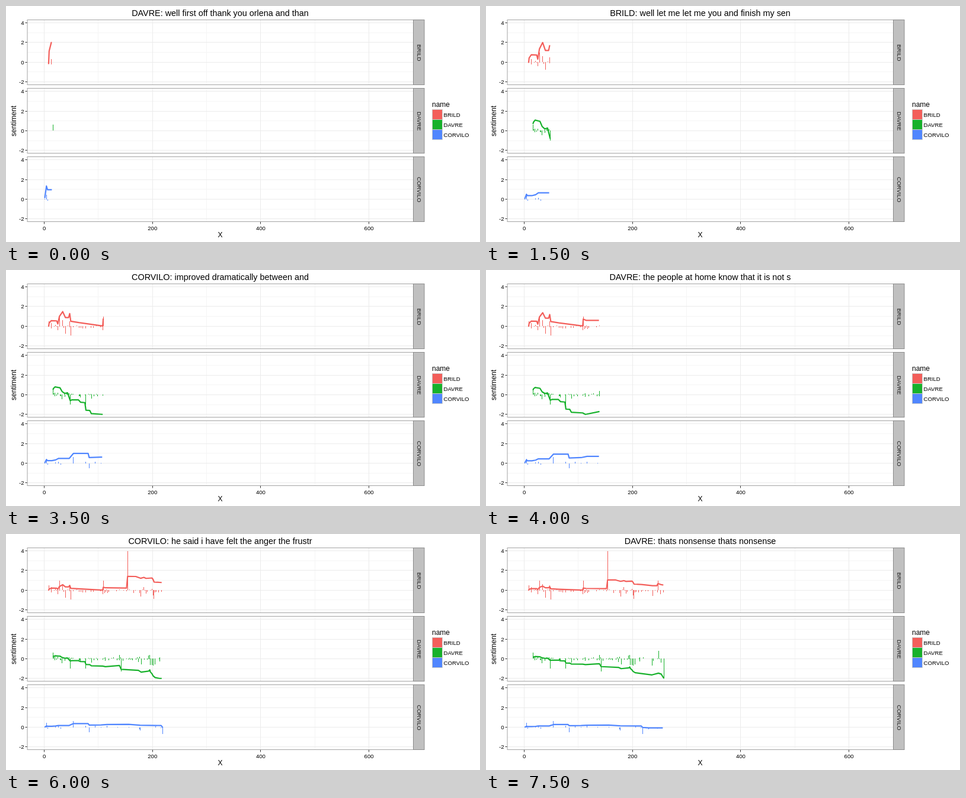
Animation of 800 by 400 pixels, one loop 8000 ms. Source, as an HTML page:

```html
<!DOCTYPE html>
<html lang="en">
<head>
<meta charset="utf-8">
<title>Sentiment by speaker</title>
<style>
  html, body { margin: 0; width: 100%; height: 100%; overflow: hidden; background: #fff; }
  svg { display: block; width: 800px; height: 400px; font-family: "Liberation Sans", Arial, sans-serif; }
</style>
</head>
<body>
<svg id="stage" viewBox="0 0 800 400"></svg>
<script>
const LOOP = 8000, STEP = 500, END = 260;
const LEFT = 36, RIGHT = 687.5, TOP = 23.5, PITCH = 116.2, PANEL_H = 110, UNIT = 16.67;

// turns: key points [x, running sum]; each one's rise or fall is drawn as a bar.
// gap, bias: mean spacing and sign balance of the small bars in between.
const speakers = [
  { name: "BRILD", color: "#f35e5a", gap: 5, bias: .7, turns: [
    [8, -.07], [9, .4], [13, .7], [23, .67], [25, .28], [28, 1.25], [34, 1.85], [39, 1.1],
    [45, 1.1], [47, 1.6], [49, .63], [64, .45], [108, .02], [109, .97], [114, .8], [152, .7],
    [154, 4.7], [169, 4.65], [178, 4.03], [184, 4.35], [188, 4], [199, 4.15], [201, 3.65],
    [203, 2.75], [217, 2.6], [237, 2.02], [245, 2.02], [247, 3.02], [252, 2.6], [257, 2.35]] },
  { name: "DAVRE", color: "#17b12b", gap: 4, bias: .5, turns: [
    [16, .63], [17, .8], [20, 1], [29, .88], [33, .4], [38, .17], [43, .25], [48, -.75],
    [51, -.65], [63, -.65], [67, -.95], [75, -1], [77, -1.97], [84, -2], [87, -2.4], [108, -2.5],
    [113, -2.7], [139, -2.3], [142, -3.6], [174, -3.95], [179, -4.55], [193, -4.2], [195, -3.8],
    [196, -4.45], [199, -5.1], [201, -5.8], [205, -6.4], [213, -6.68], [236, -7.4], [248, -6.6],
    [253, -7], [258, -9]] },
  { name: "CORVILO", color: "#5086ff", gap: 30, bias: .6, turns: [
    [1, .04], [4, .47], [6, .34], [14, .34], [21, .43], [26, .61], [46, .61], [54, 1.26],
    [81, 1.26], [83, .73], [105, .78], [116, .95], [156, 1], [177, .68], [216, .6], [219, -.1],
    [230, -.3]] }
];

// [shown up to x, speaker, words]
const steps = [
  [16, 1, "well first off thank you orlena and than"],
  [25, 0, "we are ready to get down to work and buil"],
  [37, 1, "there they go again with all of the same"],
  [48, 0, "well let me let me you and finish my sen"],
  [49, 0, "these are the facts that you want to miss"],
  [54, 1, "senator you have an opportunity to respo"],
  [83, 2, "thank you both i would like to move alon"],
  [109, 2, "improved dramatically between and"],
  [140, 1, "the people at home know that it is not s"],
  [170, 0, "i would be glad to answer that one for y"],
  [196, 1, "but they also they also hear the bad mou"],
  [203, 0, "we have to find a better way to do this"],
  [219, 2, "he said i have felt the anger the frustr"],
  [232, 1, "we ought to stop seeking out these momen"],
  [245, 0, "i cannot believe that you would say this"],
  [258, 1, "thats nonsense thats nonsense"]
];

const stage = document.getElementById("stage");

function add(tag, attrs, text) {
  const el = document.createElementNS("http://www.w3.org/2000/svg", tag);
  for (const key in attrs) el.setAttribute(key, attrs[key]);
  if (text !== undefined) el.textContent = text;
  stage.appendChild(el);
  return el;
}
const label = (text, x, y, size, anchor = "start", extra = {}) =>
  add("text", { x, y, "font-size": size, "text-anchor": anchor, fill: "#000", ...extra }, text);
const stroke = (d, color) => add("path", { d, stroke: color, fill: "none" });

const px = x => 64.6 + x * 0.9133;
const py = (panel, value) => panel.top + 71.7 - value * UNIT;
const snap = v => Math.floor(v) + 0.5;

function seeded(seed) {
  return () => (seed = (seed * 16807) % 2147483647) / 2147483647;
}

function makeBars({ turns, gap, bias }, seed) {
  const random = seeded(seed);
  const bars = turns.map(([x, sum], i) => [x, sum - (i ? turns[i - 1][1] : 0)]);
  for (let x = turns[0][0] + gap; x < END; x += gap * (0.4 + 1.2 * random())) {
    bars.push([x, (random() - bias) * 0.4]);
  }
  return bars;
}

function drawPanel(panel, i) {
  panel.top = TOP + i * PITCH;
  panel.bars = makeBars(panel, 7919 * (i + 1));
  const top = snap(panel.top), bottom = top + PANEL_H;
  const across = (v, color) => stroke(`M${LEFT} ${snap(py(panel, v))}H${RIGHT}`, color);
  const down = (x, color) => stroke(`M${snap(px(x))} ${top}V${bottom}`, color);

  [-1, 1, 3].forEach(v => across(v, "#f5f5f5"));
  [100, 300, 500].forEach(x => down(x, "#f5f5f5"));
  [0, 200, 400, 600].forEach(x => down(x, "#ebebeb"));
  for (const v of [-2, 0, 2, 4]) {
    const y = snap(py(panel, v));
    across(v, "#ebebeb");
    stroke(`M32.5 ${y}H${LEFT}`, "#333");
    label(v, 30.5, y + 3.3, 9.6, "end");
  }

  const look = { fill: "none", stroke: panel.color };
  panel.barPath = add("path", { ...look, "shape-rendering": "crispEdges" });
  panel.linePath = add("path", { ...look, "stroke-width": 2.2, "stroke-linejoin": "round" });

  const frame = { y: top, height: PANEL_H };
  add("rect", { x: LEFT, width: RIGHT - LEFT, ...frame, fill: "none", stroke: "#a3a3a3" });
  add("rect", { x: RIGHT, width: 18.5, ...frame, fill: "#c0c0c0", stroke: "#8c8c8c" });
  label(panel.name, 0, 0, 9.6, "middle", {
    fill: "#1a1a1a", transform: `translate(693.5 ${top + PANEL_H / 2 + 0.7}) rotate(90)`
  });
}

speakers.forEach(drawPanel);

for (const x of [0, 200, 400, 600]) {
  stroke(`M${snap(px(x))} 366V369.5`, "#333");
  label(x, px(x), 379.5, 9.6, "middle");
}
label("X", 361.5, 392, 12, "middle");
label("sentiment", 0, 0, 12, "middle", { transform: "translate(17 195) rotate(-90)" });
label("name", 719, 170.5, 12);
speakers.forEach(({ name, color }, i) => {
  const y = 175.5 + i * 17;
  add("rect", { x: 719.5, y, width: 17, height: 17, fill: color, stroke: "#ccc" });
  label(name, 738.5, y + 12.5, 9.6);
});
const title = label("", 361.5, 17, 14.4, "middle");

// Running sum so far, held level until just before the newest word.
function lineUpTo(turns, limit) {
  const points = turns.filter(([x]) => x <= limit);
  const [x, sum] = points[points.length - 1];
  if (x < limit - 2) points.push([limit - 2, sum]);
  return points;
}

function draw(index) {
  const [limit, who, words] = steps[index];
  title.textContent = `${speakers[who].name}: ${words}`;
  const lines = speakers.map(s => lineUpTo(s.turns, limit));
  // Lines are rescaled so the largest running sum reaches 2.
  const scale = 2 / Math.max(...lines.flat().map(([, sum]) => Math.abs(sum)));
  speakers.forEach((s, i) => {
    s.barPath.setAttribute("d", s.bars.filter(([x]) => x <= limit).map(([x, value]) =>
      `M${snap(px(x))} ${py(s, 0)}V${py(s, value)}`).join(""));
    s.linePath.setAttribute("d", "M" + lines[i].map(([x, sum]) =>
      `${px(x)} ${py(s, sum * scale)}`).join("L"));
  });
}

let shown = -1;
const start = performance.now();
function tick(now) {
  const index = Math.floor(Math.max(0, now - start) % LOOP / STEP);
  if (index !== shown) draw(shown = index);
  requestAnimationFrame(tick);
}
draw(shown = 0);
requestAnimationFrame(tick);
</script>
</body>
</html>
```
